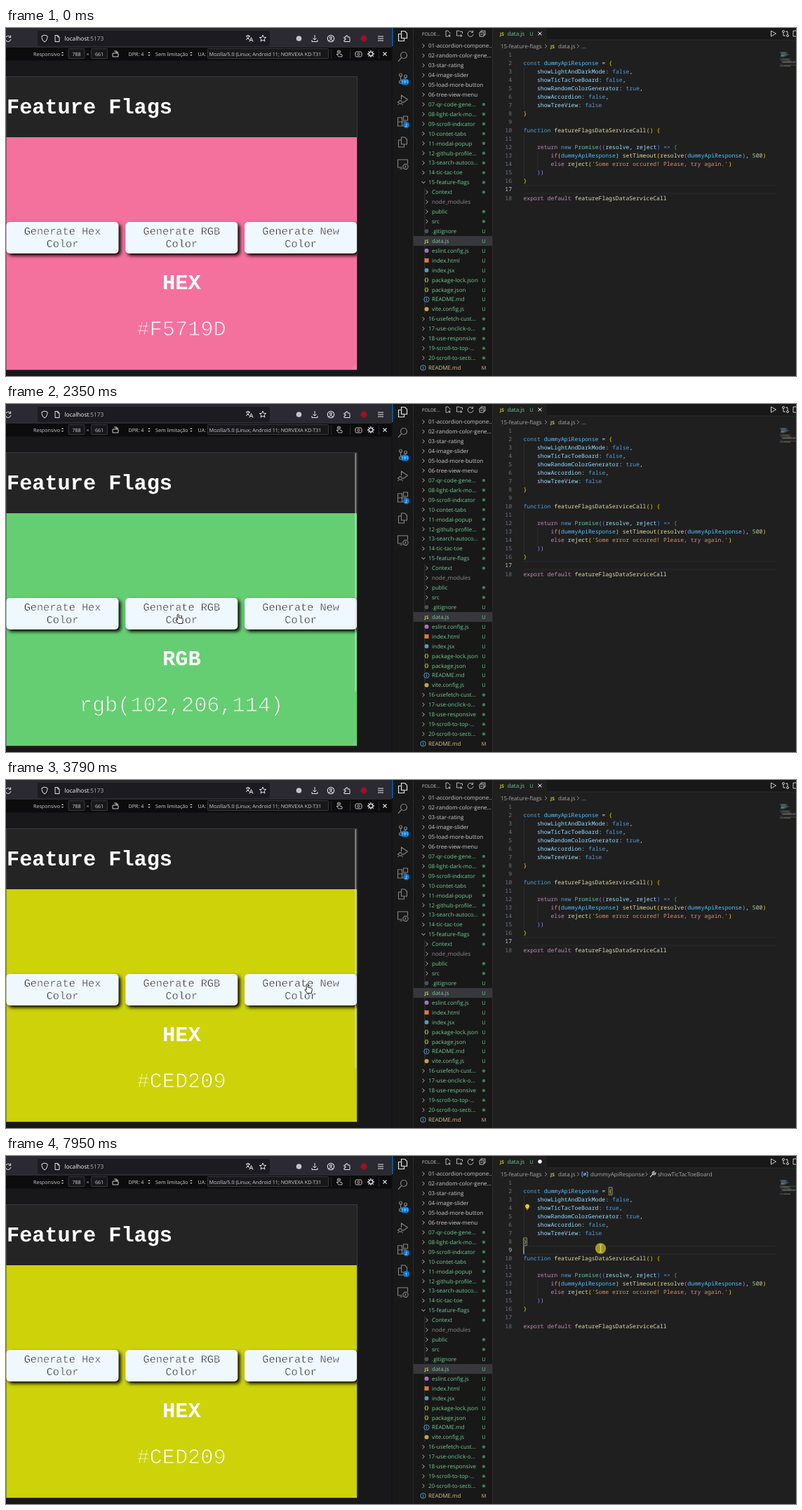
An HTML page with a canvas that plays this animation: 1126x497 px, repeating every 8000 ms.

```html
<!DOCTYPE html>
<html lang="en">
<head>
<meta charset="utf-8">
<title>Feature flags demo</title>
<style>
html, body { margin: 0; width: 100%; height: 100%; overflow: hidden; background: #181818; }
canvas { display: block; }
</style>
</head>
<body>
<canvas id="stage" width="1126" height="497"></canvas>
<script>
const g = document.getElementById('stage').getContext('2d');
g.textRendering = 'geometricPrecision';
const LOOP = 8000, CH = 4.87, LINE = 12.03, CODE_X = 737.5;
const ui = (size = 8) => `${size}px "Open Sans", "Noto Sans", sans-serif`;
const mono = (size = 8.11) => `${size}px "Noto Sans Mono", monospace`;
const page = (size, weight = '') => `${weight} ${size}px "Liberation Mono", monospace`;
const GREEN = '#73c991', GREY = '#868686', BLUE = '#0078d4';

function rect(x, y, w, h, color) {
  g.fillStyle = color;
  g.fillRect(x, y, w, h);
}
function box(x, y, w, h, r, fill, stroke) {
  g.beginPath();
  g.roundRect(x, y, w, h, r);
  if (fill) { g.fillStyle = fill; g.fill(); }
  if (stroke) { g.strokeStyle = stroke; g.lineWidth = 1; g.stroke(); }
}
function dot(x, y, r, color) {
  g.fillStyle = color;
  g.beginPath();
  g.arc(x, y, r, 0, 7);
  g.fill();
}
// y is the middle of the capitals
function text(s, x, y, color = '#cccccc', font = ui(), align = 'left') {
  g.font = font;
  g.fillStyle = color;
  g.textAlign = align;
  g.fillText(s, x, y + 2.8);
}
// centred light type: the outline takes the colour behind it
function thinText(s, x, y, color, back, size) {
  text(s, x, y, color, page(size), 'center');
  g.strokeStyle = back;
  g.lineWidth = size / 32;
  g.strokeText(s, x, y + 2.8);
}
function icon(d, x, y, color = GREY, width = 1, fill) {
  g.save();
  g.translate(x, y);
  const p = new Path2D(d);
  if (fill) { g.fillStyle = fill; g.fill(p); }
  g.strokeStyle = color;
  g.lineWidth = width;
  if (width) g.stroke(p);
  g.restore();
}
const ring = (r, x = 0, y = 0) => `M${x + r} ${y}A${r} ${r} 0 1 1 ${x - r} ${y}A${r} ${r} 0 1 1 ${x + r} ${y}`;
const RIGHT = 'M-1.5-2.6L1.3 0L-1.5 2.6', DOWN = 'M-2.6-1.5L0 1.3L2.6-1.5';
const CROSS = 'M-2.5-2.5L2.5 2.5M2.5-2.5L-2.5 2.5';
const RELOAD = 'M3.3-2A4 4 0 1 0 4 1M3.6-4.5V-1.6H.8';
const PAGES = 'M-2-7H3L6-4V3H-2ZM-2-3H-6V7H2V3';

// ---------- timeline ----------
const path = [
  [270, 833, 443], [1020, 112, 302], [1150, 111, 301], [1750, 111, 301], [2020, 236, 303],
  [2220, 236, 303], [2350, 245, 300], [2550, 250, 300], [2680, 269, 298], [3180, 429, 291],
  [4120, 429, 291], [4890, 873, 73], [5100, 878, 73], [5300, 878, 73], [5430, 880, 75],
  [5570, 880, 75], [5640, 875, 75], [7250, 875, 75], [7520, 835, 187], [7660, 835, 187], [7870, 847.5, 132]
];
const presses = [[1480, 1550, 0], [2090, 2220, 1], [3240, 3310, 2], [3510, 3580, 2], [5570, 5640], [7870, 8000]];
const swatches = [
  [0, 'HEX', '#F5719D'], [1550, 'HEX', '#6D6F6B'],
  [2220, 'RGB', 'rgb(102,206,114)'], [3310, 'HEX', '#CED209']
];
const FOCUS = 5570, EDIT = 5700, TYPE = [6170, 6310, 6580, 6720], ACCEPT = 6850, LEAVE = 7870;

function pointer(t) {
  const i = path.findIndex(p => p[0] > t);
  if (i < 0) return path.at(-1).slice(1);
  const [t0, x0, y0] = path[i - 1], [t1, x1, y1] = path[i];
  const u = (t - t0) / (t1 - t0), e = u * u * (3 - 2 * u);
  return [x0 + (x1 - x0) * e, y0 + (y1 - y0) * e];
}
function flagValue(t) {
  const typed = TYPE.filter(k => t >= k).length;
  if (typed) return 'true'.slice(0, typed);
  const gone = Math.max(0, Math.min(5, Math.floor((t - EDIT) / 70) + 1));
  return 'false'.slice(0, 5 - gone);
}

// ---------- browser ----------
function browserChrome() {
  rect(0, 0, 550, 497, '#18181a');
  rect(0, 0, 550, 28, '#2b2a33');
  box(45, 4, 331, 22, 3, '#1c1b22');
  const c = '#e4e4e8';
  icon(RELOAD, 3, 15, c);
  icon('M0-5L4-3.5Q4 3 0 5Q-4 3-4-3.5Z', 55, 15, c);
  icon('M-3-4.5H1L3-2V4.5H-3ZM.8-4V-2H3', 73, 15, c);
  text('localhost', 83.5, 15, '#fbfbfe', ui(8.3));
  text(':5173', 118, 15, '#b0b0b6', ui(8.3));
  icon('M-5-3H1M-2-5V-3M0-3Q-1 1-5 2M-4-2Q-2 1 0 2M0 5L2.5-1L5 5M1 3H4', 347, 14.5, c);
  const star = Array.from({ length: 10 }, (_, i) => {
    const r = i % 2 ? 2.2 : 5, a = i * Math.PI / 5;
    return `${(r * Math.sin(a)).toFixed(2)} ${(-r * Math.cos(a)).toFixed(2)}`;
  });
  icon(`M${star.join('L')}Z`, 366, 15, c);
  dot(417.5, 15, 3.8, '#c4c4ca');
  icon('M0-5V2M-2.5-.5L0 2L2.5-.5M-4 2V4.5H4V2', 440, 15, c);
  icon(ring(4.7) + ring(1.5, 0, -1.2) + 'M-2.8 3.3Q0 .2 2.8 3.3', 463, 15, c, 1.1);
  icon('M-4-2H-1.5V-4H1V-2H4V4.5H-4V2H-2V0H-4Z', 486, 15, c);
  dot(510, 15, 4.4, '#a4101c');
  icon('M-4-3H4M-4 0H4M-4 3H4', 534, 15, c);

  rect(0, 28, 550, 18.5, '#0c0c0d');
  const f = ui(7.15), y = 37;
  const arrows = 'M-1.6-1L0-3L1.6-1ZM-1.6 1L0 3L1.6 1Z';
  text('Responsivo', 39, y, '#d0d0d3', f);
  for (const [x, w, s] of [[89, 23, '788'], [121.5, 23, '661'], [287.5, 172, '']]) {
    box(x, 29.5, w, 14, 1, '#18181a', '#38383d');
    text(s, x + w / 2, y, '#d0d0d3', f, 'center');
  }
  text('×', 116.5, y, '#b0b0b3', f, 'center');
  icon('M-4-1H4V4H-4ZM-2-4H2V-2M0-3L2-1L4-3', 156, 37, '#c8c8cc');
  text('DPR: 4', 174.5, y, '#d0d0d3', f);
  text('Sem limitação', 213, y, '#d0d0d3', f);
  for (const x of [80.5, 204, 264]) icon(arrows, x, 37, c, 0, '#c8c8cc');
  text('UA:', 273.5, y, '#d0d0d3', f);
  g.save();
  g.beginPath();
  g.rect(288, 28, 171.5, 18);
  g.clip();
  text('Mozilla/5.0 (Linux; Android 11; NORVEXA KD-T31', 289.5, y, '#d0d0d3', f);
  g.restore();
  for (const x of [463, 490, 531]) rect(x, 30, 1, 14, '#2a2a2e');
  icon('M-1 4L-4 0L-1.5 1V-3Q-.5-4 .5-3V0L4 1V4ZM-3-2Q-3-5-.5-5Q2-5 2-2', 475, 37, '#c8c8cc', .9);
  box(498, 34, 9, 7, 1.5, null, '#c8c8cc');
  icon(ring(1.6), 502.5, 37.5, '#c8c8cc');
  icon(ring(2.7) + 'M0-5V-3M0 5V3M-5 0H-3M5 0H3M-3.5-3.5L-2-2M3.5 3.5L2 2M3.5-3.5L2-2M-3.5 3.5L-2 2', 520, 37, '#d8d8dc', 1.3);
  icon(CROSS, 540, 37, '#e0e0e4', 1.1);
}

function webPage(t, press) {
  const [, kind, color] = swatches.findLast(s => t >= s[0]);
  rect(0, 69, 501, 420, '#3a3a3d');
  rect(1, 70, 499, 86, '#242424');
  rect(.5, 156, 499.5, 332, color);
  text('Feature Flags', 1, 118.7, '#fff', page(30.25, 'bold'));
  g.save();
  g.beginPath();
  g.rect(0, 70, 500, 418);
  g.clip();
  ['Hex', 'RGB', 'New'].forEach((name, i) => {
    const down = press && press[2] === i, d = down ? 2 : 0;
    const x = .5 + i * 169.8 + d, y = 277 + d;
    g.save();
    if (!down) Object.assign(g, { shadowColor: '#000', shadowOffsetX: 3, shadowOffsetY: 3, shadowBlur: 5 });
    box(x, y, 160, 45, 5, '#f0f8ff');
    g.restore();
    thinText('Generate ' + name, x + 80, y + 15.6, '#242424', '#f0f8ff', 15.23);
    thinText('Color', x + 80, y + 33, '#242424', '#f0f8ff', 15.23);
  });
  g.restore();
  text(kind, 250.3, 370.6, '#fff', page(30.25, 'bold'), 'center');
  thinText(color, 250, 436, '#fff', color, 30.25);
  icon('M-6 0L0-6M-3 0L0-3', 499, 487.5, 'rgba(200,200,200,.5)');
  const bar = t < 780 ? 0 : Math.min(1, Math.max(0, (7110 - t) / 260));
  box(497.3, 70, 2, 341, 1, `rgba(220,220,225,${.55 * bar})`);
}

// ---------- editor side panels ----------
const files = `01-accordion-compone...|02-random-color-gene...|03-star-rating|04-image-slider|05-load-more-button|06-tree-view-menu|07-qr-code-gene...|08-light-dark-mo...|09-scroll-indicator|10-contet-tabs|11-modal-popup|12-github-profile...|13-search-autoco...|14-tic-tac-toe|15-feature-flags|Context|node_modules|public|src|.gitignore|data.js|eslint.config.js|index.html|index.jsx|package-lock.json|package.json|README.md|vite.config.js|16-usefetch-cust...|17-use-onclick-o...|18-use-responsive|19-scroll-to-top-...|20-scroll-to-secti...|README.md`.split('|');

function badge(s, x, y) {
  box(x - (s.length > 1 ? 6 : 4.5), y - 4.5, s.length > 1 ? 12 : 9, 9, 4.5, BLUE);
  text(s, x, y - .4, '#fff', ui(6), 'center');
}

function activityBar(t) {
  rect(550, 0, 144, 497, '#181818');
  rect(549.5, 0, 1, 497, '#101010');
  rect(550, 0, 1.2, 26, BLUE);
  rect(580, 0, 1, 497, '#2b2b2b');
  const x = 565.5;
  icon(PAGES, x, 11.5, '#e0e0e0', 1.2);
  icon(ring(4.5, 1.5, -2) + 'M-1.7 1.3L-6.5 6.5', x, 41, GREY, 1.2);
  icon(ring(2, -3, -5) + ring(2, -3, 5) + ring(2, 4, -3) + 'M-3-3V3M4-1Q4 2-3 2', x, 72, GREY, 1.1);
  icon('M-2-1V-7L7-1L0 4' + ring(2.4, -3.5, 3) + 'M-6 3H-8M-6 6L-7 7M-1 6L0 7', x, 103, GREY, 1.1);
  icon('M-7-5H-1V1H5V7H-7ZM-7 1H-1V7M1-7H7V-1H1Z', x, 133, GREY, 1.1);
  icon(PAGES, x, 163, GREY, 1.1);
  icon('M-1 5H-7V-6H7V0M-4 7H0' + ring(3.6, 4, 4) + 'M3 2.5L4.5 4L3 5.5', x, 194, GREY, 1.1);
  badge('191', 568.5, 77);
  badge('2', 570.5, 138.5);
  if (t >= EDIT) badge('1', 570.5, 168.5);
}

function fileIcon(name, x, y) {
  if (name.endsWith('.md')) {
    icon(ring(3.7) + 'M0-1V2.2M0-2.4V-1.5', x, y, '#519aba');
  } else if (name.startsWith('package')) {
    text('{}', x, y - .4, '#cbcb41', 'bold ' + ui(7.5), 'center');
  } else if (name === 'data.js') {
    text('JS', x, y, '#cbcb41', 'bold ' + ui(6.6), 'center');
  } else if (name === 'index.html') {
    rect(x - 3, y - 3, 6, 6, '#e37933');
  } else {
    dot(x, y, 3, { '.gitignore': '#41535b', 'eslint.config.js': '#a074c4', 'index.jsx': '#519aba' }[name] || '#cba33b');
  }
}

function explorer() {
  text('FOLDE...', 593, 8, '#cccccc', ui(6.6));
  const c = '#c5c5c5';
  icon('M-3-4H0L3-1V0M-3-4V4H0M2 1V5M0 3H4', 630, 8, c, .9);
  icon('M0 3H-4V-4H-1L0-3H4V0M2 1V5M0 3H4', 646.5, 8, c, .9);
  icon(RELOAD, 662, 8, c, .9);
  icon('M-4-2H2V4H-4ZM-2-2V-4H4V2H2M-2.5 1H.5', 679, 8, c, .9);
  rect(596.5, 228, .8, 180, '#3a3a3a');
  files.forEach((name, i) => {
    const y = 25.5 + 13.93 * i, nested = i > 14 && i < 28, file = i > 18 && i < 28 || i === 33;
    if (i === 20) rect(581, y - 7, 113, 14, '#37373d');
    const color = i < 6 ? '#cccccc' : i === 16 ? '#8c8c8c' : i === 33 ? '#e2c08d' : GREEN;
    if (file) fileIcon(name, nested ? 599.5 : 594.5, y);
    else icon(i === 14 ? DOWN : RIGHT, nested ? 600 : 595, y, '#c5c5c5', .9);
    text(name, nested ? 607 : 602, y, color);
    if (file) text(i === 33 ? 'M' : 'U', 681, y, color, ui(7.4), 'center');
    else if (i > 5 && i !== 16) dot(681, y, 2.2, '#467a58');
  });
  rect(693, 0, 1, 497, '#2b2b2b');
}

// ---------- code ----------
const source = value => `
const dummyApiResponse = {
    showLightAndDarkMode: false,
    showTicTacToeBoard: ${value},
    showRandomColorGenerator: true,
    showAccordion: false,
    showTreeView: false
}

function featureFlagsDataServiceCall() {

    return new Promise((resolve, reject) => {
        if(dummyApiResponse) setTimeout(resolve(dummyApiResponse), 500)
        else reject('Some error occured! Please, try again.')
    })
}

export default featureFlagsDataServiceCall`.split('\n');
const lineY = n => 38.2 + LINE * (n - 1);
const BRACKETS = ['#ffd700', '#da70d6', '#179fff'];

function tokenColor(word, next) {
  if (/^(const|function|new|true|false|=>)$/.test(word)) return '#569cd6';
  if (/^(return|if|else|export|default)$/.test(word)) return '#c586c0';
  if (word === 'Promise') return '#4ec9b0';
  if (word === 'dummyApiResponse') return '#4fc1ff';
  if (word[0] === "'") return '#ce9178';
  if (/^\d/.test(word)) return '#b5cea8';
  if (next === '(' || word.startsWith('feature')) return '#dcdcaa';
  return /^\w/.test(word) ? '#9cdcfe' : '#d4d4d4';
}

function code(t, value, active) {
  for (const [n, m, col] of [[3, 7, 0], [11, 15, 0], [13, 14, 4]])
    rect(CODE_X + col * CH + .5, lineY(n) - 6, .8, LINE * (m - n + 1), '#333333');
  rect(738, lineY(active) - 6.3, 360, 1, '#2b2b2b');
  rect(738, lineY(active) + 5.2, 360, 1, '#2b2b2b');
  if (t >= FOCUS) {
    for (const [n, col] of [[2, 25], [8, 0]])
      box(CODE_X + col * CH, lineY(n) - 5.5, CH, 11, 0, '#1f2a1f', '#888888');
  }
  let depth = 0;
  source(value).forEach((line, i) => {
    const y = lineY(i + 1);
    text(i + 1, 721, y, i + 1 === active ? '#cccccc' : '#6e7681', mono(), 'right');
    for (const m of line.matchAll(/'[^']*'|\w+|=>|\S/g)) {
      const s = m[0];
      let color = tokenColor(s, line[m.index + s.length]);
      if ('({'.includes(s)) color = BRACKETS[depth++ % 3];
      else if (')}'.includes(s)) color = BRACKETS[--depth % 3];
      text(s, CODE_X + m.index * CH, y, color, mono());
      g.globalAlpha = .5;
      rect(1103 + m.index * .36, 33 + i * 1.22, s.length * .36, .9, color);
      g.globalAlpha = 1;
    }
  });
  rect(1103, 33 + (active - 1) * 1.22, 23, 1, '#4a4a4a');
}

function editorHead(t) {
  rect(694, 0, 432, 497, '#1f1f1f');
  rect(771, 0, 355, 17, '#181818');
  rect(771, 16.5, 355, 1, '#2b2b2b');
  const js = 'bold ' + ui(6.6), crumb = '#a9a9a9';
  text('JS', 704, 8, '#cbcb41', js);
  text('data.js', 714.5, 8, GREEN);
  text('U', 749, 8, GREEN, ui(7.4), 'center');
  if (t < EDIT) icon(CROSS, 761, 8, '#ffffff', 1);
  else dot(761, 8, 2.7, '#ffffff');
  text('15-feature-flags', 705, 26, crumb);
  text('JS', 776, 26, '#cbcb41', js);
  text('data.js', 787, 26, crumb);
  icon(RIGHT, 769.5, 26, crumb, .8);
  icon(RIGHT, 815.5, 26, crumb, .8);
  if (t < FOCUS) {
    text('...', 820, 26, crumb);
  } else {
    variableIcon(825, 26);
    text('dummyApiResponse', 833, 26, crumb);
    icon(RIGHT, 913, 26, crumb, .8);
    icon('M-4 4L1-1M4-2Q4 1 1 1Q-1 0-1-2Q0-4 2-4L1-2L2-1Z', 922, 26, '#c5c5c5', 1.1);
    text('showTicTacToeBoard', 929, 26, crumb);
  }
  icon('M-3-4L4 0L-3 4Z', 1093.5, 8, '#cccccc');
  icon(ring(1.5, -3, -3) + ring(1.5, 3, 3) + 'M-3-1V3H0M3 1V-3H0', 1111, 8, '#cccccc');
  icon('M4-4H-3V4H4', 1125, 8, '#cccccc');
}

// ---------- completion list ----------
function variableIcon(x, y) {
  icon('M-2.5-3H-4V3H-2.5M2.5-3H4V3H2.5' + ring(1.5) + 'M-1.5 1.5L1.5-1.5', x, y, '#75beff', .9);
}
const KEY = 'k', VAR = 'v', SNIP = 's';
const options = [
  ['true', KEY], ['try', KEY], ['transformWithEsbuild', VAR, 'vite', 1114.5], ['trycatch', SNIP, 'Try-Catch Statement', 1052.5],
  ['TrackEvent', VAR], ['TransformStream', VAR], ['TransformStreamDefaultController', VAR], ['TransitionEvent', VAR],
  ['TreeWalker', VAR], ['TimeRanges', VAR], ['throw', KEY], ['throw', SNIP, 'Throw Exception', 1069]
];
function hits(label, query) {
  const found = [];
  let at = -1;
  for (const ch of query) {
    at = label.toLowerCase().indexOf(ch, at + 1);
    if (at < 0) return null;
    found.push(at);
  }
  return found;
}
function suggestions(query) {
  const rows = options.filter(o => hits(o[0], query));
  box(864.5, 80.5, 270, rows.length * LINE + 2, 1, '#202020', '#454545');
  rect(865, 81, 261, LINE, '#04395e');
  rows.forEach(([label, kind, detail, dx], i) => {
    const y = 87 + i * LINE, found = hits(label, query);
    if (kind === VAR) variableIcon(871, y);
    else if (kind === KEY) icon('M-4-2.5H4M-4 0H-1M1 0H4M-4 2.5H2', 871, y, '#cccccc', 1.2);
    else icon('M-3.5-3.5H3.5V3.5H-3.5Z', 871, y, '#cccccc', .9);
    [...label].forEach((ch, k) => {
      const hit = found.includes(k);
      text(ch, 879 + k * CH, y, hit ? '#2aaaff' : i ? '#cccccc' : '#ffffff', (hit ? 'bold ' : '') + mono());
    });
    if (detail) text(detail, dx, y - .4, '#a0a0a0', mono(6.78));
  });
}

function caretAndBulb(t, value, active) {
  if (t < FOCUS) return;
  icon('M-1.5 2V1Q-3-.5-2.5-2A2.6 2.6 0 0 1 2.5-2Q3-.5 1.5 1V2ZM-1 3.7H1', 743, 73, '#ffcc00', .8, '#ffcc00');
  const since = t >= LEAVE ? t - LEAVE : t >= TYPE[3] ? t - TYPE[3] : t >= EDIT ? 0 : t - FOCUS;
  const col = t >= LEAVE ? 0 : 24 + value.length;
  if (since % 1000 < 500) rect(CODE_X + col * CH, lineY(active) - 5.8, 1, 11.5, '#e0e0e0');
}

// ---------- mouse ----------
function mouse(t, press) {
  if (t < 270) return;
  const [x, y] = pointer(t);
  if (press) dot(x, y, 7.7, 'rgba(246,230,12,.62)');
  const overButton = y > 277 && y < 322 && x < 500 && (x % 169.8) < 161;
  if (x > 694) {
    icon('M-2-5.5Q0-5.5 0-4Q0-5.5 2-5.5M0-4V4M-2 5.5Q0 5.5 0 4Q0 5.5 2 5.5', x, y, '#d8d8d8', .9);
  } else if (overButton) {
    icon('M-.8 8.5V1Q.3-.8 1.4 1V5L6.5 6.2Q7.6 6.8 7.3 8.5L6.3 13.5H.5L-3 8.8Q-2.8 7-.8 8.5Z', x, y, '#222222', 1, '#ffffff');
  } else {
    icon('M0 0V11.5L2.7 9L4.5 13L6.2 12.2L4.4 8.4H8Z', x, y, '#222222', .8, '#ffffff');
  }
}

function draw(t) {
  const press = presses.find(p => t >= p[0] && t < p[1]);
  const value = flagValue(t);
  const active = t < FOCUS ? 17 : t < LEAVE ? 4 : 9;
  browserChrome();
  webPage(t, press);
  activityBar(t);
  explorer();
  editorHead(t);
  code(t, value, active);
  caretAndBulb(t, value, active);
  if (t >= TYPE[0] && t < ACCEPT) suggestions(value);
  mouse(t, press);
}

const start = performance.now();
function tick() {
  draw((performance.now() - start) % LOOP);
  requestAnimationFrame(tick);
}
tick();
</script>
</body>
</html>
```
